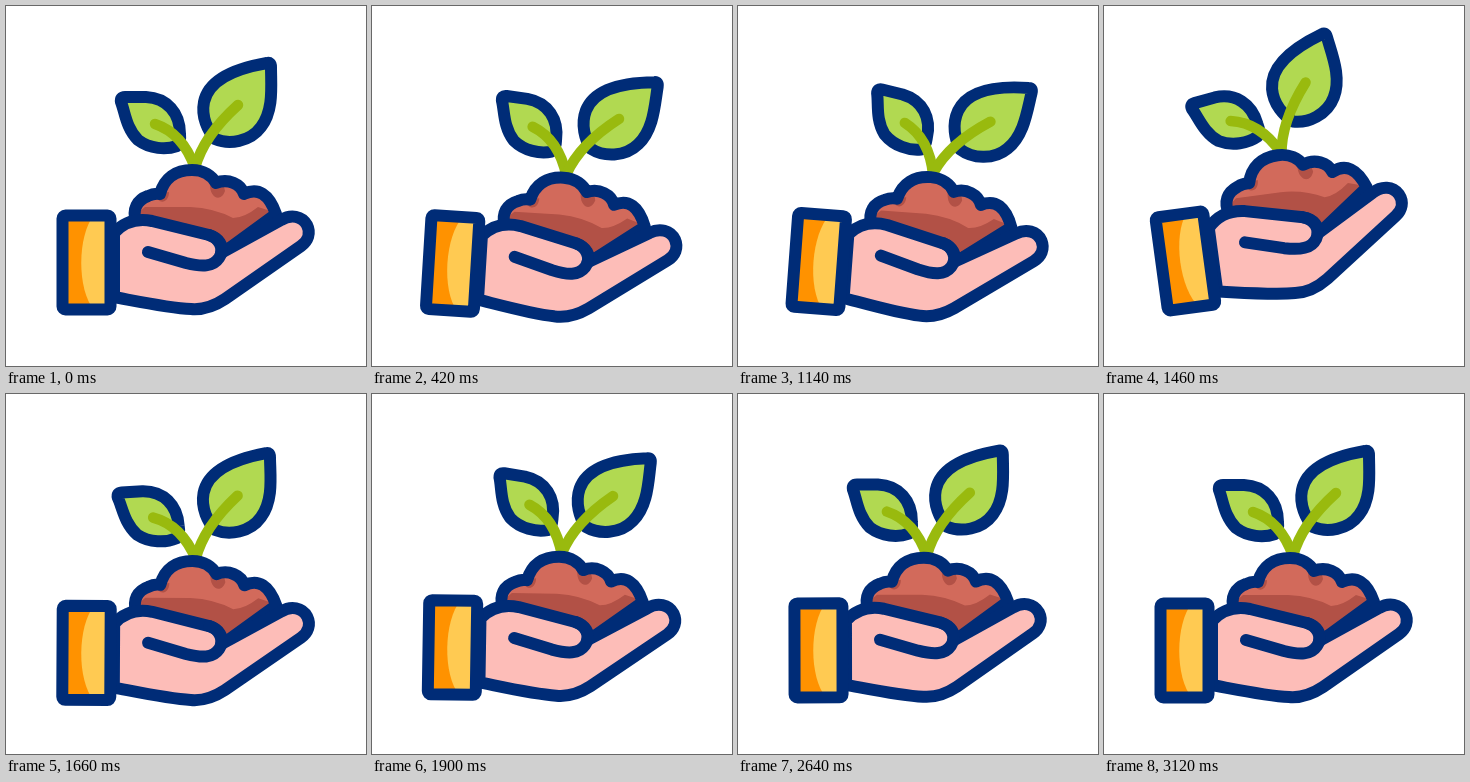
An HTML page with a canvas for the animation above (3400 ms loop, 360 px wide and 360 px high).

```html
<!DOCTYPE html>
<html lang="en">
<head>
<meta charset="utf-8">
<title>Seedling in hand</title>
<style>
html, body { margin: 0; width: 100%; height: 100%; overflow: hidden; background: #fff; }
canvas { display: block; width: 360px; height: 360px; }
</style>
</head>
<body>
<canvas id="stage"></canvas>
<script>
const LOOP = 3400, PERIOD = 660;
const NAVY = '#002c77', STEM = '#99ba0e', LEAF = '#b1d951';
const canvas = document.getElementById('stage');
const ctx = canvas.getContext('2d');
const dpr = window.devicePixelRatio || 1;
canvas.width = canvas.height = 360 * dpr;

const shape = d => new Path2D(d);
const sleeve = new Path2D();
sleeve.roundRect(56.5, 209.5, 48, 94, 3);
const cuffLight = shape('M88 209H105V304H88C71 284 71 230 88 209Z');
const palm = shape('M108 227C118 216 130 212 146 215L203 229C213 232 218 240 215 247' +
  'L275 214C285 208 296 210 301 219C305 227 302 235 295 240L219 293' +
  'C207 301 197 304 185 303C163 302 130 295 108 291Z');
const thumb = shape('M142 246L180 257C196 261 207 261 213 252C219 243 213 232 203 229');
const soil = shape('M130 216C126 203 131 194 142 190Q148 187 154 188' +
  'C158 172 170 164 186 164C198 164 206 170 210 177' +
  'C222 172 235 178 238 188C252 181 263 188 270 208L218 246Z');
const soilShade = shape('M124 214L139 201L184 201Q208 202 227 212Q238 212 252 201L274 208L218 246Z');
const clods = shape('M150 188C151 199 163 198 163 186ZM204 177C203 192 215 197 219 185L217 176Z');
const bigLeaf = shape('M261 57C232 62 203 72 198 96C195 111 202 125 209 133' +
  'C223 139 244 136 255 121C268 104 265 80 265 61Q265 56 261 57Z');
const bigStem = shape('M189 162C195 139 212 117 232 99');
const smallLeaf = shape('M119 91L140 91C161 92 174 107 174 128Q175 136 171 140' +
  'C160 144 144 143 132 134C120 122 119 106 115 96Q114 91 119 91Z');
const smallStem = shape('M149 118C170 125 182 142 189 162');

function smooth(a, b, t) {
  const u = Math.min(1, Math.max(0, (t - a) / (b - a)));
  return u * u * (3 - 2 * u);
}

// A swing that fades in and dies away; lag is the time of one crest.
function swing(t, mid, amp, lag) {
  const fade = smooth(210, 450, t) * (1 - smooth(1450, 2780, t));
  return fade * (mid + amp * Math.cos(2 * Math.PI * (t - lag) / PERIOD));
}

function turn(deg, x, y) {
  ctx.translate(x, y);
  ctx.rotate(deg * Math.PI / 180);
  ctx.translate(-x, -y);
}

function fill(path, color) {
  ctx.fillStyle = color;
  ctx.fill(path);
}

function line(path, color = NAVY, width = 12) {
  ctx.strokeStyle = color;
  ctx.lineWidth = width;
  ctx.stroke(path);
}

function sprig(leaf, stem, deg, pivotX) {
  ctx.save();
  turn(deg, pivotX, 157);
  fill(leaf, LEAF);
  line(leaf);
  line(stem, STEM, 10.5);
  ctx.restore();
}

function drawSoil() {
  ctx.save();
  ctx.clip(soil);
  fill(soil, '#d26a5b');
  fill(soilShade, '#b25146');
  fill(clods, '#b25146');
  ctx.restore();
  line(soil);
}

function drawHand() {
  fill(palm, '#fdbdb8');
  line(palm);
  line(thumb);
  fill(sleeve, '#ff9200');
  fill(cuffLight, '#ffca52');
  line(sleeve);
}

function draw(t) {
  ctx.setTransform(dpr, 0, 0, dpr, 0, 0);
  ctx.fillStyle = '#fff';
  ctx.fillRect(0, 0, 360, 360);
  ctx.lineCap = ctx.lineJoin = 'round';
  // The arm bobs, its tilt follows, and the leaves trail behind.
  ctx.translate(0, swing(t, -4, 11.5, 435));
  turn(swing(t, -1.7, 6, 470), 180, 256);
  sprig(smallLeaf, smallStem, swing(t, 0.5, 11.5, 550), 189);
  sprig(bigLeaf, bigStem, swing(t, 0.5, 10, 525), 205);
  drawSoil();
  drawHand();
}

const start = performance.now();
function tick() {
  draw((performance.now() - start) % LOOP);
  requestAnimationFrame(tick);
}
tick();
</script>
</body>
</html>
```
